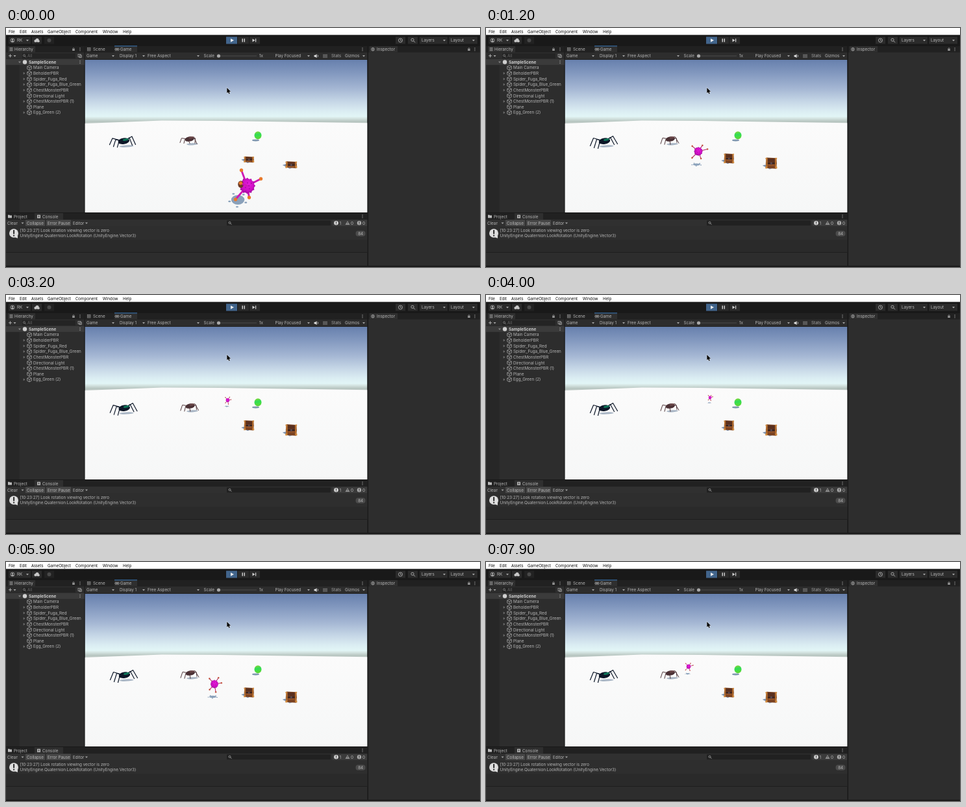
Write an HTML page with a canvas that moves like this. It is 730 px wide and 368 px high and loops after 8000 ms.

```html
<!DOCTYPE html>
<html lang="en">
<head>
<meta charset="utf-8">
<title>Game editor</title>
<style>
html, body { margin: 0; width: 100%; height: 100%; overflow: hidden; background: #191919; }
canvas { display: block; width: 730px; height: 368px; }
</style>
</head>
<body>
<canvas id="stage" width="730" height="368"></canvas>
<script>
const LOOP = 8000;
const c = document.getElementById('stage').getContext('2d');
const TAU = Math.PI * 2;
const VIEW = { x: 121.5, y: 49, w: 435, h: 235 };
const lerp = (a, b, k) => a + (b - a) * k;
const ease = k => { k = Math.min(1, Math.max(0, k)); return k * k * (3 - 2 * k); };

function rect(x, y, w, h, col) { c.fillStyle = col; c.fillRect(x, y, w, h); }
function oval(x, y, rx, ry, col, rot = 0) {
  c.fillStyle = col;
  c.beginPath();
  c.ellipse(x, y, rx, ry, rot, 0, TAU);
  c.fill();
}
function ring(x, y, r, col, w = 0.8) {
  c.strokeStyle = col; c.lineWidth = w;
  c.beginPath(); c.arc(x, y, r, 0, TAU); c.stroke();
}
function trace(pts) {
  c.beginPath();
  pts.forEach(([x, y]) => c.lineTo(x, y));
}
function poly(pts, col) { trace(pts); c.fillStyle = col; c.fill(); }
function line(pts, col, w = 0.8) {
  trace(pts); c.strokeStyle = col; c.lineWidth = w; c.stroke();
}
function text(s, x, y, col = '#b8b8b8', weight = 400, size = 6.3, family = 'Inter') {
  c.font = `${weight} ${size}px ${family}, sans-serif`;
  c.fillStyle = col;
  c.fillText(s, x, y + 2.2);
}
function arrow(x, y, col = '#a8a8a8') {
  poly([[x - 2, y - 1], [x + 2, y - 1], [x, y + 1.4]], col);
}
function dots(x, y) { for (let i = -1; i < 2; i++) rect(x - 0.5, y + i * 2 - 0.5, 1, 1, '#bbb'); }
function lock(x, y) {
  rect(x - 1.8, y - 0.3, 3.6, 2.8, '#999');
  c.strokeStyle = '#999'; c.lineWidth = 0.7;
  c.beginPath(); c.arc(x, y - 0.5, 1.3, Math.PI, TAU); c.stroke();
}
function lens(x, y, r = 1.8, col = '#bbb') {
  ring(x, y, r, col);
  line([[x + r * 0.7, y + r * 0.7], [x + r * 1.9, y + r * 1.9]], col, 0.9);
}
function cube(x, y) {
  const v = [[0, -3.6], [3.3, -1.9], [3.3, 1.9], [0, 3.6], [-3.3, 1.9], [-3.3, -1.9], [0, -3.6]];
  line(v.map(([a, b]) => [x + a, y + b]), '#b4b4b4', 0.7);
  line([[x - 3.3, y - 1.9], [x, y], [x + 3.3, y - 1.9]], '#b4b4b4', 0.7);
  line([[x, y], [x, y + 3.6]], '#b4b4b4', 0.7);
}
function bars(x, y) { for (let i = -1; i < 2; i++) rect(x - 2, y + i * 2 - 0.4, 5, 0.8, '#bbb'); }

function drawTop() {
  rect(0, 10, 730, 18, '#191919');
  rect(0, 0, 730, 10.6, '#fff');
  [['File', 4], ['Edit', 21], ['Assets', 39], ['GameObject', 64], ['Component', 107], ['Window', 149], ['Help', 180]]
    .forEach(([s, x]) => text(s, x, 5.4, '#000', 400, 6.2, 'Open Sans'));
  rect(4, 13.5, 34, 11, '#2b2b2b');
  ring(10, 19, 3, '#c0c0c0', 0.7);
  oval(10, 18, 1.1, 1.1, '#c0c0c0');
  oval(10, 20.6, 1.7, 1, '#c0c0c0');
  text('RK', 17, 19);
  arrow(33, 19);
  rect(40, 13.5, 15, 11, '#2b2b2b');
  oval(45.5, 20, 2.2, 1.9, '#c8c8c8');
  oval(48, 18.8, 2.6, 2.7, '#c8c8c8');
  oval(49.8, 20.2, 2, 1.7, '#c8c8c8');
  rect(59, 13.5, 15, 11, '#222');
  oval(66.5, 19, 3, 3, '#4a4a4a');
  rect(339, 13.5, 17, 11, '#42658c');
  rect(357, 13.5, 17, 11, '#2b2b2b');
  rect(375, 13.5, 16, 11, '#2b2b2b');
  poly([[346, 16.2], [351, 19], [346, 21.8]], '#eee');
  rect(363.5, 16.4, 1.5, 5.2, '#ccc');
  rect(366.5, 16.4, 1.5, 5.2, '#ccc');
  poly([[379.5, 16.4], [383.7, 19], [379.5, 21.6]], '#ccc');
  rect(384, 16.4, 1.2, 5.2, '#ccc');
  rect(600, 13.5, 15, 11, '#2b2b2b');
  ring(607.5, 19, 3, '#bbb');
  line([[607.5, 17], [607.5, 19.2], [609.2, 19.8]], '#bbb', 0.7);
  rect(619, 13.5, 15, 11, '#2b2b2b');
  lens(626, 18.3, 2.1);
  rect(637, 13.5, 43, 11, '#2b2b2b');
  text('Layers', 640, 19); arrow(675, 19);
  rect(682, 13.5, 44, 11, '#2b2b2b');
  text('Layout', 685, 19); arrow(720, 19);
}

function drawHierarchy() {
  rect(0, 28, 120.5, 256, '#2d2d2d');
  rect(0, 28, 120.5, 9.5, '#212121');
  rect(3, 28, 42, 9.5, '#2f2f2f');
  bars(7.5, 32.8);
  text('Hierarchy', 13, 32.8);
  lock(104, 32.5); dots(114, 32.8);
  rect(0, 47.5, 20.5, 236.5, '#272727');
  rect(25, 39, 82, 8, '#242424');
  line([[4, 42.8], [9, 42.8]], '#bbb', 0.9);
  line([[6.5, 40.3], [6.5, 45.3]], '#bbb', 0.9);
  arrow(13.5, 43);
  lens(28, 42.3, 1.5, '#888');
  text('All', 33, 43, '#666');
  c.strokeStyle = '#aaa'; c.lineWidth = 0.7;
  c.strokeRect(111, 40.5, 4, 4);
  c.strokeRect(113, 42, 3.5, 3.5);
  rect(0, 48, 120.5, 8.8, '#3b3b3b');
  arrow(21, 52.5, '#888');
  oval(29, 52.5, 3.2, 3.2, '#d0d0d0');
  text('SampleScene', 35, 52.5, '#d2d2d2', 700);
  dots(114, 52.5);
  ['Main Camera', 'BeholderPBR', 'Spider_Fuga_Red', 'Spider_Fuga_Blue_Green', 'ChestMonsterPBR',
    'Directional Light', 'ChestMonsterPBR (1)', 'Plane', 'Egg_Green (2)'].forEach((s, i) => {
    const y = 61.2 + i * 8.62;
    cube(36, y);
    text(s, 42, y);
    if (![0, 5, 7].includes(i)) poly([[26.7, y - 2], [29.6, y], [26.7, y + 2]], '#6d6d6d');
  });
}

function drawGameBar() {
  rect(121.5, 28, 435, 9.5, '#212121');
  rect(167, 28, 35, 9.5, '#2f2f2f');
  rect(167, 27.3, 35, 1, '#3a79bb');
  c.strokeStyle = '#aaa'; c.lineWidth = 0.6;
  c.strokeRect(125.5, 30.5, 4.5, 4.5);
  line([[125.5, 32.7], [130, 32.7]], '#aaa', 0.6);
  line([[127.7, 30.5], [127.7, 35]], '#aaa', 0.6);
  text('Scene', 134, 32.8);
  ring(169.5, 32.8, 1.5, '#ccc');
  ring(172.5, 32.8, 1.5, '#ccc');
  text('Game', 176, 32.8);
  dots(549, 32.8);
  rect(121.5, 37.5, 435, 11, '#2d2d2d');
  [['Game', 124], ['Display 1', 175], ['Free Aspect', 218], ['Scale', 304.5], ['1x', 390], ['Play Focused', 414.5],
    ['Gizmos', 522]].forEach(([s, x]) => text(s, x, 43));
  text('Stats', 501, 43, '#a8a8a8');
  [165, 212, 296, 466, 551].forEach(x => arrow(x, 43));
  line([[328, 43], [386, 43]], '#555', 0.8);
  oval(327.5, 43, 2.6, 2.6, '#aaa');
  rect(474.5, 41.8, 2, 2.6, '#ddd');
  poly([[476, 42], [478.6, 40.2], [478.6, 46], [476, 44.3]], '#ddd');
  line([[480, 41.4], [480.7, 43], [480, 44.7]], '#ddd', 0.7);
  for (let i = 0; i < 3; i++) rect(488, 40.8 + i * 1.9, 7, 1.1, '#777');
}

function drawConsole() {
  rect(0, 285, 556.5, 81, '#2d2d2d');
  rect(0, 285, 556.5, 10, '#212121');
  rect(44, 285, 44, 10, '#2f2f2f');
  poly([[3, 287.7], [5.3, 287.7], [6, 288.6], [9, 288.6], [9, 292.6], [3, 292.6]], '#bbb');
  text('Project', 12, 290.3);
  rect(48, 287.8, 5, 5, '#bbb');
  rect(49, 289, 3, 0.7, '#333');
  rect(49, 290.6, 3, 0.7, '#333');
  text('Console', 56, 290.3);
  dots(549, 290);
  rect(0, 295, 556.5, 10.5, '#303030');
  rect(30, 295.5, 30, 9.5, '#474747');
  rect(62, 295.5, 38, 9.5, '#474747');
  [['Clear', 2], ['Collapse', 32], ['Error Pause', 64], ['Editor', 103]].forEach(([s, x]) => text(s, x, 300.4));
  arrow(25.5, 300.4); arrow(124, 300.4);
  rect(340, 296.3, 160, 8, '#212121');
  lens(344.5, 299.8, 1.5, '#aaa');
  rect(503, 295.5, 53, 9.5, '#3b3b3b');
  oval(508.5, 300.2, 3.3, 3.3, '#d4d4d4');
  rect(508, 298, 1, 2.8, '#333'); rect(508, 301.4, 1, 1, '#333');
  text('1', 513.5, 300.4);
  poly([[526, 297], [529.5, 303], [522.5, 303]], '#8f8f8f');
  rect(525.6, 299, 0.9, 2.2, '#333');
  text('0', 531, 300.4);
  oval(544, 300.2, 3.2, 3.2, '#aaa');
  rect(543.5, 298, 1, 2.8, '#333'); rect(543.5, 301.4, 1, 1, '#333');
  text('0', 549, 300.4);
  rect(0, 305.5, 556.5, 20.5, '#2e2e2e');
  rect(0, 326, 556.5, 20, '#2a2a2a');
  rect(0, 345, 556.5, 0.8, '#1c1c1c');
  oval(12, 316, 7, 6.8, '#dedede');
  poly([[13, 322], [18, 319], [18, 323.8]], '#dedede');
  rect(11.1, 311, 2, 6.2, '#2b2b2b');
  rect(11.1, 318.6, 2, 2, '#2b2b2b');
  text('[10:23:27] Look rotation viewing vector is zero', 21.5, 311.8);
  text('UnityEngine.Quaternion:LookRotation (UnityEngine.Vector3)', 21.5, 320.2);
  c.fillStyle = '#4b4b4b';
  c.beginPath(); c.roundRect(538.5, 312.3, 15, 8.4, 4); c.fill();
  text('84', 542.2, 316.6);
}

function drawInspector() {
  rect(558, 28, 172, 338, '#2d2d2d');
  rect(558, 28, 172, 9.5, '#212121');
  rect(560, 28, 43, 9.5, '#2f2f2f');
  ring(565, 32.8, 2.3, '#bbb', 0.8);
  rect(564.6, 31.3, 0.9, 3, '#ccc');
  text('Inspector', 571, 32.8);
  lock(713, 32.5); dots(722, 32.8);
}

function drawWorld() {
  const sky = c.createLinearGradient(0, 49, 0, 147);
  [[0, '#6780ad'], [0.2, '#8197be'], [0.45, '#a4b6d3'], [0.65, '#c5d6e6'], [0.8, '#daecf2'],
    [0.89, '#e2f6f6'], [0.93, '#cfdedb'], [0.97, '#b6c4bf'], [1, '#c3cdc9']].forEach(([k, col]) => sky.addColorStop(k, col));
  rect(VIEW.x, VIEW.y, VIEW.w, VIEW.h, sky);
  const ground = c.createLinearGradient(0, 142, 0, 284);
  ground.addColorStop(0, '#fbfbfb');
  ground.addColorStop(1, '#f6f7f7');
  poly([[121.5, 147], [240, 142.6], [330, 143], [556.5, 146.3], [556.5, 284], [121.5, 284]], ground);
  oval(384.5, 173, 5.5, 1.4, '#8098b0');
  const egg = c.createLinearGradient(387, 159.5, 389, 171);
  egg.addColorStop(0, '#7cd83a');
  egg.addColorStop(0.4, '#2fdc58');
  egg.addColorStop(0.7, '#4ade40');
  egg.addColorStop(1, '#5fcf35');
  oval(388, 165.3, 5.5, 6.1, egg);
}

function drawSpider(x, y, s, legs, lean, skin, mark) {
  c.save();
  c.translate(x, y);
  c.lineJoin = c.lineCap = 'round';
  oval(3, 7.5, 11 * s, 1.6, 'rgba(125,145,168,.65)', -0.05);
  legs.forEach(([kx, ky, tx, ty]) => {
    const shift = -lean * (tx > 0 ? 3 : 1), lift = lean * (tx > 0 ? 1 : -1.8);
    line([[-lean, 0], [kx - lean * 1.6, ky + lean * 0.4], [tx + shift, ty + lift]], skin, 1.2 * s);
  });
  oval(-lean * 1.2, -0.4, 8.8 * s, 4.7 * s, skin, -0.15);
  oval(3 * s - lean * 1.2, -2.6, 4.6 * s, 1.7 * s, mark, -0.2);
  oval(-6 * s - lean, 1.3, 2.6 * s, 2.5 * s, skin);
  c.restore();
}
const DARK_LEGS = [[-17, -5, -22, 7], [-12, -3, -16, 10], [-7, 0, -10, 11], [13, -8, 20, 4], [9, -6, 15, 5]];
const BROWN_LEGS = [[-12, -2, -15, 7], [-7, 0, -9, 8], [-1, 2, 0, 8], [7, -4, 13, 6], [9, -2, 10, 5]];

function drawChest(x, y, s, rise, bob) {
  c.save();
  c.translate(x, y);
  c.scale(s, s);
  const h = lerp(9.5, 15.5, rise) + bob * rise, w = 15, e = w / 2;
  const top = -h, mid = -h * 0.5;
  poly([[-e - 4.5, -4.5], [-e + 1, -6], [2, -1], [-2, 0.6]], 'rgba(95,122,155,.8)');
  poly([[-e + 1, top], [e - 0.5, top + 0.7], [e, mid], [e - 0.6, 0], [-e + 0.6, -1], [-e, mid]], '#7a4222');
  poly([[-e + 2.5, top + 1], [e - 2.5, top + 1.5], [e - 2, mid - 1], [-e + 2, mid - 1.6]], '#59301f');
  rect(-e + 0.5, mid - 0.8, w - 1, 1.9, '#33211f');
  for (const k of [-1, 1]) {
    rect(k * (e - 1.5) - 1, top + 0.8, 2, h - 1.8, '#b8702f');
    rect(k * (e - 0.7) - 1.2, -3, 2.4, 2.6, '#d08a3c');
    rect(k * (e - 0.7) - 1, top + 0.3, 2, 1.8, '#d08a3c');
  }
  rect(-4, mid + 2.2, 8, 1, '#a85f2b');
  rect(-1.2, mid - 1.3, 2.4, 3.3, '#5b4a50');
  c.restore();
}

// time, x, y, body radius, width of the tentacle spread
const PATH = [
  [0, 371.5, 243, 12, 1], [900, 333, 201, 8, 1], [1200, 327, 190, 6.6, 1], [2400, 336, 168, 4, 1],
  [4000, 345, 158, 2.6, 0.75], [5900, 321, 188, 6.4, 0.9], [7100, 331, 157, 2.6, 0.7], [7900, 312, 161, 3.6, 0.9],
  [8000, 310, 162, 3.8, 0.9]
];
const HORIZON = 143, CENTRE = 338;
const NEAR_TIPS = [[-0.75, -2], [1.75, -0.9], [-0.85, -0.35], [-1.5, 1.75], [0.25, 1.5]];
const FAR_TIPS = [[-1.35, -1.3], [2, -0.4], [1, -1.45], [-1.35, 1.4], [0.5, 1.8]];

// moves evenly over the ground, so depth (1 / radius) runs linearly
function beholderAt(t) {
  let i = 0;
  while (i < PATH.length - 2 && t >= PATH[i + 1][0]) i++;
  const [t0, x0, y0, r0, w0] = PATH[i], [t1, x1, y1, r1, w1] = PATH[i + 1];
  const k = (t - t0) / (t1 - t0);
  const r = 1 / lerp(1 / r0, 1 / r1, k);
  return {
    r,
    x: CENTRE + r * lerp((x0 - CENTRE) / r0, (x1 - CENTRE) / r1, k),
    y: HORIZON + r * lerp((y0 - HORIZON) / r0, (y1 - HORIZON) / r1, k),
    w: lerp(w0, w1, k)
  };
}

function drawBeholder(t) {
  const { x, y, r, w } = beholderAt(t);
  const turn = ease(t / 900);
  const sx = x - r * lerp(1.2, 0.4, turn), sy = y + r * lerp(1.8, 3.05, turn);
  const shade = 'rgba(112,140,172,.8)';
  oval(sx, sy, r * 0.85, r * lerp(0.62, 0.26, turn), shade);
  for (let i = 0; i < 5; i++) {
    const a = i * TAU / 5 + 0.4;
    oval(sx + Math.cos(a) * r * 1.1, sy + Math.sin(a) * r * lerp(0.9, 0.35, turn), r * 0.17, r * 0.1, shade);
  }
  c.lineCap = 'round';
  const tips = NEAR_TIPS.map(([a, b], i) => {
    const [p, q] = FAR_TIPS[i], sway = Math.sin(t / 210 + i * 2) * 0.13 * turn;
    return [x + r * w * (lerp(a, p, turn) + sway), y + r * (lerp(b, q, turn) - sway)];
  });
  const arm = turn > 0.6 ? '#b02a68' : '#cf18b4';
  const ball = turn > 0.6 ? '#c4553f' : '#e8792b';
  const size = r * lerp(0.21, 0.17, turn) + 0.15;
  const tip = ([px, py]) => {
    line([[x, y], [px, py]], arm, Math.max(0.75, r * lerp(0.24, 0.17, turn)));
    oval(px, py, size, size, ball);
  };
  tips.forEach(tip);
  const skin = c.createRadialGradient(x + r * 0.2, y - r * 0.3, 0, x, y, r * 1.1);
  skin.addColorStop(0, '#e51bdc');
  skin.addColorStop(0.65, '#cf0fc4');
  skin.addColorStop(1, '#8f0b91');
  const pts = [];
  for (let i = 0; i < 36; i++) {
    const a = i * TAU / 36, k = r * (i % 3 ? 0.92 : 1.05);
    pts.push([x + Math.cos(a) * k * Math.sqrt(w), y + Math.sin(a) * k]);
  }
  poly(pts, skin);
  if (turn < 0.5) {
    oval(x - r * 0.83, y - r * 0.2, r * 0.36, r * 0.45, '#6b3a24');
    tip(tips[2]);
  }
  if (r > 5) for (let i = 0; i < 7; i++) {
    const a = i * 2.4, d = r * (0.22 + i * 0.08);
    oval(x + Math.cos(a) * d, y + Math.sin(a) * d, r * 0.08, r * 0.08, '#a5089f');
  }
}

function drawCursor() {
  const p = [[340.3, 92], [340.3, 100.3], [342.1, 98.8], [343.4, 101.6], [344.8, 101], [343.6, 98.2], [346, 98], [340.3, 92]];
  line(p, 'rgba(255,255,255,.7)', 1);
  poly(p, '#0a0a0a');
}

function draw(t) {
  rect(0, 0, 730, 368, '#191919');
  drawTop();
  drawHierarchy();
  drawGameBar();
  drawConsole();
  drawInspector();
  c.save();
  c.beginPath(); c.rect(VIEW.x, VIEW.y, VIEW.w, VIEW.h); c.clip();
  drawWorld();
  const beat = Math.cos(t / 1775 * TAU);
  const lean = Math.max(0, beat) ** 1.5;
  drawSpider(182.5, 174.5, 1, DARK_LEGS, lean, '#0d1728', '#0e7558');
  drawSpider(284, 171.3, 0.8, BROWN_LEGS, lean, '#4b3135', '#6d4a4b');
  const rise = ease((t - 50) / 750), bob = 0.5 * beat;
  drawChest(374.2, lerp(207.3, 208.6, rise), 1, rise, bob);
  drawChest(439.3, lerp(216, 216.8, rise), 1.13, rise, bob);
  drawBeholder(t);
  drawCursor();
  c.restore();
}

const start = performance.now();
function tick() {
  const t = (performance.now() - start) % LOOP;
  draw(Math.floor(t / 100) * 100);
  requestAnimationFrame(tick);
}
tick();
</script>
</body>
</html>
```
